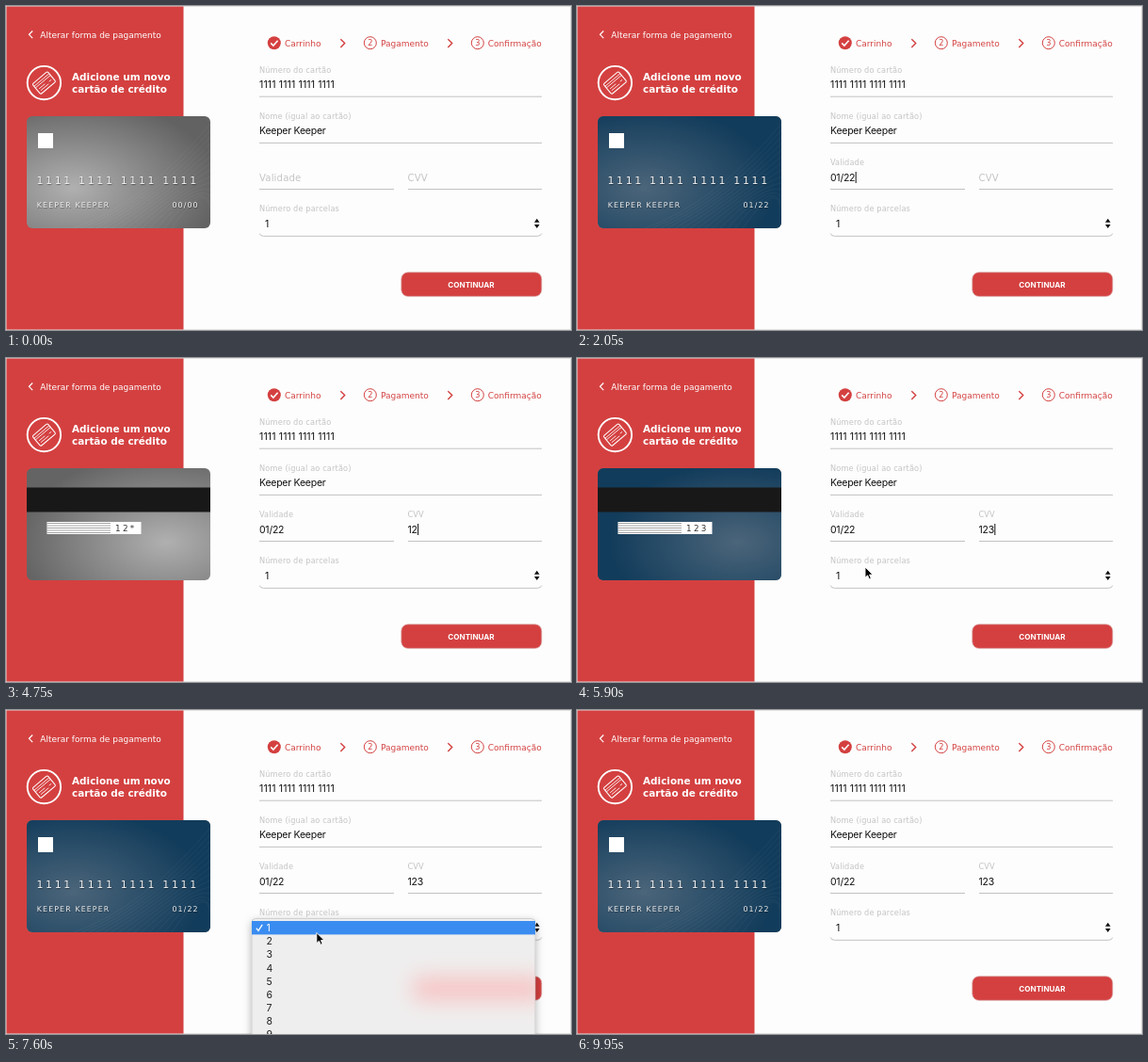
Write an HTML page that moves like this. It is 600x344 px and loops after 10000 ms.

```html
<!DOCTYPE html>
<html lang="pt">
<head>
<meta charset="utf-8">
<title>Pagamento</title>
<style>
html, body { margin: 0; width: 100%; height: 100%; overflow: hidden; background: #fdfdfd; }
svg { position: absolute; left: 0; top: 0; display: block; }
text { font-family: "DejaVu Sans", sans-serif; white-space: pre; }
.in, .menu text { font-family: Inter, sans-serif; font-size: 10.5px; letter-spacing: -.25px; fill: #111; }
.in.wide { letter-spacing: .14px; }
.lab { font-size: 8.2px; letter-spacing: .14px; fill: #c4c4c4; }
.step { font-size: 9px; fill: #d44040; }
.num { font-size: 8.2px; text-anchor: middle; fill: #d44040; }
.line { fill: none; stroke: #c2c2c2; }
.title { font-size: 10.45px; font-weight: bold; fill: #fff; }
#scene { position: absolute; left: 22px; top: 117px; width: 194.5px; height: 119px; perspective: 500px; }
#card { position: absolute; inset: 0; transform-style: preserve-3d; }
.face { position: absolute; inset: 0; border-radius: 6px; overflow: hidden; backface-visibility: hidden; }
.back { transform: rotateY(180deg); }
.face text { fill: #fff; }
.face .emb { text-shadow: .5px 1px 1px rgba(0,0,0,.4); fill: #f2f2f2; }
.small { font-size: 7.9px; letter-spacing: 1.1px; }
</style>
</head>
<body>
<svg id="page" width="600" height="344" viewBox="0 0 600 344">
  <rect width="600" height="344" fill="#fdfdfd"/>
  <rect x=".5" y=".5" width="599" height="343" fill="none" stroke="#e2e2e2"/>
  <rect x=".5" y=".5" width="188" height="343" fill="#d44040"/>
  <path d="M28.2 26.5L24.5 30.3L28.2 34.1" fill="none" stroke="#fff" stroke-width="1.2"/>
  <text x="36.3" y="33.5" font-size="9" fill="#fff">Alterar forma de pagamento</text>
  <circle cx="40.4" cy="81.6" r="17.7" fill="none" stroke="#fff" stroke-width="1.9"/>
  <g transform="translate(40.4 81.6) rotate(-40)" fill="none" stroke="#fff">
    <rect x="-10.5" y="-7" width="21" height="14" rx="1.5" stroke-width="1"/>
    <path d="M-10.5 -4H10.5M-10.5 -1.8H10.5" stroke-width=".8"/>
    <path d="M-8 1.4H0M-8 4H3M5 2.4H8" stroke-width=".8"/>
  </g>
  <text class="title" x="70" y="79.3">Adicione um novo</text>
  <text class="title" x="70" y="92.2">cartão de crédito</text>

  <circle cx="284.8" cy="39.2" r="7" fill="#d44040"/>
  <path d="M281.2 39.4L283.9 42L288.6 36.8" fill="none" stroke="#fff" stroke-width="1.6"/>
  <text class="step" x="296" y="42.6">Carrinho</text>
  <text class="step" x="398" y="42.6">Pagamento</text>
  <text class="step" x="511.8" y="42.6">Confirmação</text>
  <g fill="none" stroke="#d44040">
    <path d="M355.3 35.3L359.7 39.6L355.3 43.9M469.3 35.3L473.7 39.6L469.3 43.9" stroke-width="1.4"/>
    <circle cx="386.8" cy="39.2" r="6.5"/>
    <circle cx="500.8" cy="39.2" r="6.5"/>
  </g>
  <text class="num" x="386.8" y="42.2">2</text>
  <text class="num" x="500.8" y="42.2">3</text>

  <text class="lab" x="269" y="70.5">Número do cartão</text>
  <text class="in wide" x="269" y="87">1111 1111 1111 1111</text>
  <text class="lab" x="269" y="119.7">Nome (igual ao cartão)</text>
  <text class="in" x="269" y="136.3">Keeper Keeper</text>
  <text class="lab" id="dateLab">Validade</text>
  <text class="in" id="date" x="269" y="185.7"></text>
  <text class="lab" id="cvvLab">CVV</text>
  <text class="in" id="cvv" x="426.5" y="185.7"></text>
  <rect id="caret" y="176" width="1" height="12" fill="#111"/>
  <path class="line" d="M269 96.2H569M269 145.4H569M269 194.5H412M427 194.5H569"/>
  <text class="lab" x="269" y="218.3">Número de parcelas</text>
  <text class="in" x="275" y="235">1</text>
  <path class="line" d="M269.3 241.5Q269.8 244.3 273.5 244.3H564.5Q568.2 244.3 568.7 241.5"/>
  <path d="M561 229.8L563.8 225.8L566.6 229.8ZM561 232L563.8 236L566.6 232Z" fill="#111"/>
  <rect x="419.8" y="282.8" width="149" height="25.5" rx="7" fill="#d44040" stroke="#d9a5a5" stroke-width=".7"/>
  <text x="494" y="298.7" text-anchor="middle" fill="#fff" style="font:bold 8.1px Inter,sans-serif">CONTINUAR</text>
</svg>

<div id="scene"><div id="card">
  <div class="face"><svg width="195" height="119" viewBox="0 0 195 119">
    <defs>
      <radialGradient id="greyF" cx=".25" cy=".64" r=".8"><stop offset="0" stop-color="#b0b0b0"/><stop offset="1" stop-color="#626262"/></radialGradient>
      <radialGradient id="blueF" cx=".25" cy=".64" r=".72"><stop offset="0" stop-color="#4b657a"/><stop offset="1" stop-color="#123c5b"/></radialGradient>
      <radialGradient id="greyB" cx=".76" cy=".66" r=".8"><stop offset="0" stop-color="#b0b0b0"/><stop offset="1" stop-color="#646464"/></radialGradient>
      <radialGradient id="blueB" cx=".76" cy=".66" r=".7"><stop offset="0" stop-color="#4b657a"/><stop offset="1" stop-color="#123c5b"/></radialGradient>
    </defs>
    <rect width="195" height="119" fill="url(#greyF)"/>
    <rect id="frontBlue" width="195" height="119" fill="url(#blueF)"/>
    <path id="waves" fill="none" stroke="#fff" stroke-opacity=".06" stroke-width=".8"/>
    <rect x="12" y="18" width="16" height="16" fill="#fff"/>
    <text class="emb" x="10.5" y="71.6" font-size="11" letter-spacing="2.62">1111 1111 1111 1111</text>
    <text class="emb small" x="10.8" y="97.2">KEEPER KEEPER</text>
    <text class="emb small" id="cardDate" x="154.5" y="97.2"></text>
  </svg></div>
  <div class="face back"><svg width="195" height="119" viewBox="0 0 195 119">
    <rect width="195" height="119" fill="url(#greyB)"/>
    <rect id="backBlue" width="195" height="119" fill="url(#blueB)"/>
    <rect y="20.5" width="195" height="26" fill="#181818"/>
    <rect x="21.5" y="57" width="100" height="13" fill="#fff"/>
    <path d="M21.5 58.5H89M21.5 61H89M21.5 63.5H89M21.5 66H89M21.5 68.5H89" stroke="#a5a5a5"/>
    <text id="cardCvv" x="94" y="66.6" font-size="8.8" letter-spacing="2.3" style="fill:#333"></text>
  </svg></div>
</div></div>

<svg id="top" width="600" height="344" viewBox="0 0 600 344">
  <defs>
    <filter id="soft" x="-30%" y="-150%" width="160%" height="400%"><feGaussianBlur stdDeviation="11"/></filter>
    <filter id="shade" x="-10%" y="-10%" width="120%" height="120%"><feDropShadow dx="0" dy="3" stdDeviation="4" flood-opacity=".3"/></filter>
    <clipPath id="box"><rect x="261" y="221.5" width="301" height="140" rx="4"/></clipPath>
  </defs>
  <g id="menu" class="menu">
    <rect x="261" y="221.5" width="301" height="140" rx="4" fill="#efeeee" stroke="#bbb" stroke-width=".6" filter="url(#shade)"/>
    <g clip-path="url(#box)"><rect x="432" y="283" width="140" height="26" rx="7" fill="#f9b8b8" opacity=".75" filter="url(#soft)"/></g>
    <rect id="hover" x="261" width="301" height="14.4" fill="#3a8cf0"/>
    <path id="tick" d="M265.8 231.6L268 234.4L272.2 227.8" fill="none" stroke-width="1.3"/>
    <g id="items"></g>
  </g>
  <path id="mouse" d="M0 0V11.2L2.6 8.8L4.4 12.8L6.3 12L4.6 8.1H8.1Z" fill="#000" stroke="#fff" stroke-width=".9"/>
</svg>

<script>
const LOOP = 10000, ROW = 14.18, MENU_Y = 224;
const el = id => document.getElementById(id);
const set = (id, attrs) => { for (const k in attrs) el(id).setAttribute(k, attrs[k]); };
const clamp = v => Math.max(0, Math.min(1, v));
const part = (t, start, len) => clamp((t - start) / len);
const mix = (a, b, p) => a + (b - a) * p;
const smooth = p => p * p * (3 - 2 * p);

// cubic-bezier(.25, .1, .25, 1)
function ease(x) {
  let lo = 0, hi = 1, s = .5;
  for (let i = 0; i < 20; i++) {
    s = (lo + hi) / 2;
    const v = .75 * s * (1 - s) + s ** 3;
    if (v < x) lo = s; else hi = s;
  }
  return .3 * (1 - s) ** 2 * s + 3 * (1 - s) * s * s + s ** 3;
}

const fields = [
  { id: 'date', x: 269, full: '01/22', focus: 400, blur: 2850, keys: [700, 950, 1100, 1350, 1600], blank: '00/00', out: 'cardDate', tint: 'frontBlue' },
  { id: 'cvv', x: 426.5, full: '123', focus: 2850, blur: 6360, keys: [4300, 4600, 4900], blank: '***', out: 'cardCvv', tint: 'backBlue' }
];
const MENU_ON = 6360, MENU_OFF = 8435;
const path = [
  [5150, 345, -20], [5900, 306, 222], [6300, 312, 229], [6700, 335.5, 234.5],
  [7500, 335.5, 234.5], [8200, 235.5, 268.5], [8700, 235.5, 268.5], [9200, 225, 350]
];

let waves = '';
for (let i = 0; i < 14; i++) waves += `M${50 + i * 8} 119Q${125 + i * 5} ${92 - i * 2} 195 ${8 + i * 7}`;
set('waves', { d: waves });

const items = Array.from({ length: 9 }, (_, i) => {
  const n = document.createElementNS('http://www.w3.org/2000/svg', 'text');
  n.textContent = i + 1;
  n.setAttribute('x', 276.6);
  n.setAttribute('y', 235 + i * ROW);
  return el('items').appendChild(n);
});

function mouseAt(t) {
  const i = path.findIndex(p => p[0] > t);
  if (i < 1) return null;
  const [t0, x0, y0] = path[i - 1], [t1, x1, y1] = path[i];
  const p = smooth((t - t0) / (t1 - t0));
  return [mix(x0, x1, p), mix(y0, y1, p)];
}

function drawField(f, t) {
  const typed = f.full.slice(0, f.keys.filter(k => k <= t).length);
  el(f.id).textContent = typed;
  el(f.out).textContent = typed + f.blank.slice(typed.length);
  const up = ease(part(t, f.focus, 200));
  const lab = el(f.id + 'Lab');
  lab.setAttribute('transform', `translate(${f.x} ${mix(186.2, 169.2, up)}) scale(${mix(1.23, 1, up)})`);
  const last = f.keys[f.keys.length - 1];
  el(f.tint).style.opacity = ease(part(t, last, 400));
  if (t >= f.focus && t < f.blur) {
    const since = t - Math.max(f.focus, ...f.keys.filter(k => k <= t));
    const w = typed ? el(f.id).getComputedTextLength() : 0;
    set('caret', { x: f.x + w + .4, opacity: since % 1000 < 500 ? 1 : 0 });
  }
}

function drawMenu(t, pos) {
  const shown = t < MENU_ON ? 0 : 1 - part(t, MENU_OFF, 230);
  el('menu').style.opacity = shown;
  el('menu').style.display = shown ? '' : 'none';
  const row = pos && pos[0] > 261 && t < MENU_OFF ? Math.floor((pos[1] - MENU_Y) / ROW) : -1;
  set('hover', { y: MENU_Y + Math.max(row, 0) * ROW, opacity: row < 0 ? 0 : 1 });
  set('tick', { stroke: row === 0 ? '#fff' : '#222' });
  items.forEach((n, i) => { n.style.fill = i === row ? '#fff' : '#222'; });
}

function draw(t) {
  set('caret', { opacity: 0 });
  fields.forEach(f => drawField(f, t));
  const turn = ease(part(t, 2850, 500)) - ease(part(t, 6368, 500));
  el('card').style.transform = `rotateY(${-180 * turn}deg)`;
  const pos = mouseAt(t);
  drawMenu(t, pos);
  set('mouse', { opacity: pos ? 1 : 0, transform: `translate(${pos || '0 0'})` });
}

const begin = performance.now();
function tick() {
  draw((performance.now() - begin) % LOOP);
  requestAnimationFrame(tick);
}
tick();
</script>
</body>
</html>
```
